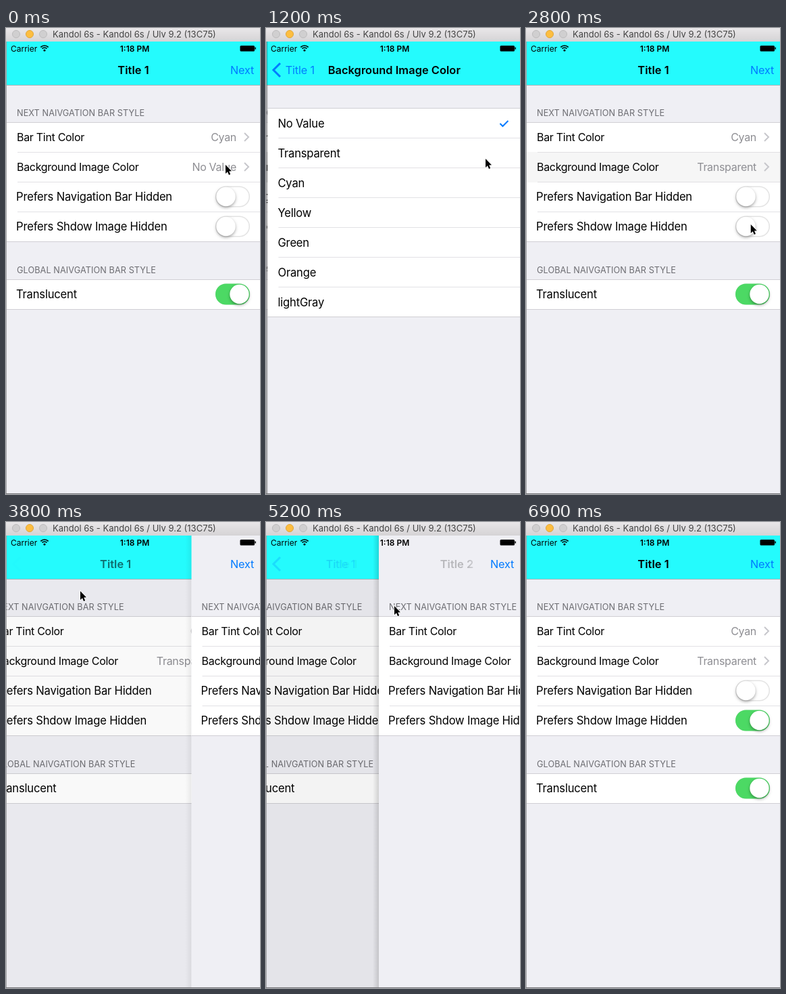
Write an HTML page with a canvas that moves like this. It is 376 px wide and 688 px high and loops after 7 s.

```html
<!DOCTYPE html>
<html lang="en">
<head>
<meta charset="utf-8">
<title>Navigation bar demo</title>
<style>
  html, body { margin: 0; width: 100%; height: 100%; overflow: hidden; background: #efeff4; }
  canvas { display: block; width: 376px; height: 688px; }
</style>
</head>
<body>
<canvas id="stage" width="376" height="688"></canvas>
<script>
const ctx = document.getElementById('stage').getContext('2d');
const LOOP = 7000, STEP = 100, WIDTH = 375;
const BLUE = '#007aff', CYAN = '#24fbfd', GRAY = '#8e8e93', BACK = '#efeff4';
const LINE = '#d0cfd4', THIN_LINE = '#e2e1e5';
const FACE = 'Inter, "Open Sans", sans-serif';
const STYLES = {
  window: [`13px ${FACE}`, 0],
  status: [`12px ${FACE}`, 0],
  clock: [`600 12px ${FACE}`, 0],
  title: [`600 16.4px ${FACE}`, 0.05],
  button: [`16.2px ${FACE}`, -0.1],
  cell: [`16px ${FACE}`, -0.3],
  label: [`16.6px ${FACE}`, -0.2],
  header: [`12.7px ${FACE}`, 0.08]
};
const COLORS = ['No Value', 'Transparent', 'Cyan', 'Yellow', 'Green', 'Orange', 'lightGray'];
const COLOR_TITLE = 'Background Image Color';

// Rows of [time, value, ...]; values are linear between rows.
const CURSOR = [
  [0, 325, 202], [700, 325, 202], [1000, 325, 193], [1200, 325, 193], [1400, 324, 182],
  [1600, 322, 181], [2000, 42, 64], [2120, 44, 64], [2200, 66, 70], [2700, 332, 290],
  [3100, 335, 290], [3500, 348, 62], [3720, 346, 62], [3800, 110, 102], [4000, 24, 117],
  [4300, 14, 118], [4450, 14, 118], [4700, 70, 120], [5200, 190, 124], [5800, 308, 128],
  [6000, 350, 131], [6100, 390, 134], [LOOP, 390, 134]
];
const DRAG = [
  [4400, 0], [4500, 3], [4600, 14], [4700, 34], [5200, 166], [5800, 288],
  [5900, 305], [6000, 342], [6100, 363], [6200, 371], [6300, 375]
];

const clamp = v => Math.max(0, Math.min(1, v));
const lerp = (a, b, k) => a + (b - a) * k;
const ramp = (t, from, span) => clamp((t - from) / span);

function track(table, t) {
  let i = 1;
  while (i < table.length - 1 && table[i][0] < t) i++;
  const a = table[i - 1], b = table[i], k = ramp(t, a[0], b[0] - a[0]);
  return a.slice(1).map((v, n) => lerp(v, b[n + 1], k));
}

function spring(ms) {
  const x = Math.max(0, ms) * 0.018;
  return x > 9 ? 1 : 1 - (1 + x) * Math.exp(-x);
}

// page: how far the upper page is moved out (0..1); bar: the same for bar items.
// fade: exponents for the root title, the back button and the upper title.
function transition(t) {
  const slide = (upper, start, push, fade) => {
    const at = ms => push ? 1 - spring(ms) : spring(ms);
    return { upper, page: at(t - start), bar: at(t - start - 12), fade };
  };
  if (t < 770) return null;
  if (t < 2128) return slide('colors', 770, true, [2.7, 2.5, 2]);
  if (t < 2800) return slide('colors', 2128, false, [1.2, 7, 2]);
  if (t < 3743.5) return null;
  if (t < 4400) return slide('second', 3743.5, true, [2.7, 2.5, 2.5]);
  if (t >= 6300) return null;
  const k = track(DRAG, t)[0] / WIDTH;
  return { upper: 'second', page: k, bar: k, fade: [4, 2.5, 2.5] };
}

function rect(x, y, w, h, color) {
  ctx.fillStyle = color;
  ctx.fillRect(x, y, w, h);
}

function setStyle(style) {
  [ctx.font, ctx.letterSpacing] = [STYLES[style][0], STYLES[style][1] + 'px'];
}

function text(str, x, y, style, color = '#000', align = 'left') {
  setStyle(style);
  ctx.textAlign = align;
  ctx.fillStyle = color;
  ctx.fillText(str, x, y);
}

function polyline(points, color, width) {
  ctx.beginPath();
  points.forEach(([x, y]) => ctx.lineTo(x, y));
  ctx.strokeStyle = color;
  ctx.lineWidth = width;
  ctx.stroke();
}

function disc(x, y, r, fill, stroke) {
  ctx.beginPath();
  ctx.arc(x, y, r, 0, 7);
  ctx.fillStyle = fill;
  ctx.fill();
  if (stroke) {
    ctx.strokeStyle = stroke;
    ctx.lineWidth = 1;
    ctx.stroke();
  }
}

function pill(x, y, w, h, r, color) {
  ctx.beginPath();
  ctx.roundRect(x, y, w, h, r);
  ctx.fillStyle = color;
  ctx.fill();
}

function withAlpha(alpha, draw) {
  ctx.save();
  ctx.globalAlpha = clamp(alpha);
  draw();
  ctx.restore();
}

function toggle(x, y, on) {
  pill(x, y - 15.5, 51, 31, 15.5, '#e3e3e3');
  pill(x + 1.5, y - 14, 48, 28, 14, '#fff');
  withAlpha(on, () => pill(x, y - 15.5, 51, 31, 15.5, '#4cd964'));
  ctx.save();
  ctx.shadowColor = 'rgba(0,0,0,.35)';
  ctx.shadowBlur = 4;
  ctx.shadowOffsetY = 2;
  disc(x + 15.5 + 20 * on, y, 14.2, '#fff');
  ctx.restore();
}

function group(x, y, rows) {
  rect(1 + x, y, WIDTH, rows * 44 + 1, '#fff');
  for (let i = 0; i <= rows; i++) {
    const inset = i % rows ? 16 : 0;
    rect(1 + x + inset, y + i * 44, WIDTH - inset, 1, inset ? THIN_LINE : LINE);
  }
}

function valueRow(x, y, name, value) {
  text(name, 16 + x, y + 6, 'cell');
  text(value, 341 + x, y + 6, 'cell', GRAY, 'right');
  polyline([[353 + x, y - 6], [359 + x, y], [353 + x, y + 6]], '#c7c7cc', 2);
}

function toggleRow(x, y, name, on) {
  text(name, 15 + x, y + 6, 'label');
  toggle(310 + x, y, on);
}

function settingsPage(x, t, isRoot) {
  rect(1 + x, 20, WIDTH, 668, BACK);
  text('NEXT NAIVGATION BAR STYLE', 16 + x, 130, 'header', '#6d6d72');
  group(x, 139, 4);
  if (isRoot && t >= 700 && t < 2900) {
    withAlpha(1 - ramp(t, 2500, 400), () => rect(1 + x, 183, WIDTH, 45, '#d9d9d9'));
  }
  valueRow(x, 161, 'Bar Tint Color', 'Cyan');
  valueRow(x, 205, 'Background Image Color', COLORS[t < 1500 ? 0 : 1]);
  toggleRow(x, 249, 'Prefers Navigation Bar Hidden', 0);
  toggleRow(x, 293, 'Prefers Shdow Image Hidden', ramp(t, 2850, 250));
  if (!isRoot) return;
  text('GLOBAL NAIVGATION BAR STYLE', 16 + x, 362, 'header', '#6d6d72');
  group(x, 371, 1);
  toggleRow(x, 393, 'Translucent', 1);
}

function colorsPage(x, t) {
  rect(1 + x, 85, WIDTH, 603, BACK);
  group(x, 118, COLORS.length);
  if (t >= 1400 && t < 1800) {
    withAlpha(1 - ramp(t, 1500, 300), () => rect(1 + x, 162, WIDTH, 44, '#d9d9d9'));
  }
  COLORS.forEach((name, i) => text(name, 16 + x, 147 + i * 44, 'label'));
  const y = t < 1500 ? 141 : 185;
  polyline([[345 + x, y], [349 + x, y + 4], [357 + x, y - 4]], BLUE, 2);
}

function barItems(move) {
  setStyle('title');
  const centered = str => 188.5 - ctx.measureText(str).width / 2;
  const q = move ? move.bar : 1;
  const [titleFade, backFade, upperFade] = move ? move.fade : [1, 1, 1];
  const labelX = lerp(28, centered('Title 1'), q);

  withAlpha(q ** titleFade, () => text('Title 1', labelX, 68, 'title'));
  withAlpha(move && move.upper === 'colors' ? q ** 4 : 1,
    () => text('Next', 332, 68, 'button', BLUE));
  if (!move) return;

  withAlpha((1 - q) ** backFade, () => {
    polyline([[21, 52], [11, 62], [21, 72]], BLUE, 3);
    text('Title 1', labelX, 68, 'button', BLUE);
  });
  withAlpha((1 - q) ** upperFade, () => {
    const name = move.upper === 'colors' ? COLOR_TITLE : 'Title 2';
    const edge = ctx.createLinearGradient(298, 0, 319, 0);
    edge.addColorStop(0, '#000');
    edge.addColorStop(1, 'rgba(0,0,0,0)');
    setStyle('title');
    text(name, lerp(centered(name), 376, q), 68, 'title', edge);
  });
}

function statusBar() {
  text('Carrier', 7, 35, 'status');
  [8, 5].forEach(r => {
    ctx.beginPath();
    ctx.arc(57, 34, r, -Math.PI * 0.75, -Math.PI * 0.25);
    ctx.strokeStyle = '#000';
    ctx.lineWidth = 1.7;
    ctx.stroke();
  });
  disc(57, 33, 1.6, '#000');
  text('1:18 PM', 190.5, 35, 'clock', '#000', 'center');
  pill(346.5, 26, 21.5, 8.5, 1.5, '#000');
  rect(368.5, 28.5, 1.5, 3, '#000');
}

function windowFrame() {
  const shade = ctx.createLinearGradient(0, 0, 0, 20);
  shade.addColorStop(0, '#e9e7e9');
  shade.addColorStop(1, '#d5d3d5');
  rect(0, 0, 376, 20, shade);
  disc(15, 9, 5.5, '#d0cfd0', '#bdbcbd');
  disc(35, 9, 5.5, '#fdbe41', '#e0a63a');
  disc(55, 9, 5.5, '#d0cfd0', '#bdbcbd');
  text('Kandol 6s - Kandol 6s / Ulv 9.2 (13C75)', 69, 14, 'window', '#444');
  rect(0, 20, 1, 668, '#a3a3a6');
  rect(0, 687, 376, 1, '#77777a');
}

function pointer(x, y) {
  ctx.save();
  ctx.translate(x, y);
  ctx.beginPath();
  [[0, 0], [0, 13], [3, 10.3], [5, 15], [7.2, 14], [5.2, 9.5], [9, 9.3]]
    .forEach(([px, py]) => ctx.lineTo(px, py));
  ctx.closePath();
  ctx.strokeStyle = '#fff';
  ctx.lineWidth = 1.6;
  ctx.stroke();
  ctx.fillStyle = '#000';
  ctx.fill();
  ctx.restore();
}

function draw(t) {
  const move = transition(t);
  const x = move ? move.page * WIDTH : WIDTH;
  ctx.save();
  ctx.beginPath();
  ctx.rect(1, 20, WIDTH, 667);
  ctx.clip();

  settingsPage(-0.3 * (WIDTH - x), t, true);
  if (x < WIDTH) rect(1, 85, x, 603, `rgba(0,0,0,${0.085 * (1 - move.page)})`);
  if (move && move.upper === 'colors') colorsPage(x, t);
  rect(1, 20, WIDTH, 64, CYAN);
  rect(1, 84, WIDTH, 1, '#a9b4b8');
  if (x < WIDTH) {
    const shadow = ctx.createLinearGradient(x - 8, 0, x + 1, 0);
    shadow.addColorStop(0, 'rgba(0,0,0,0)');
    shadow.addColorStop(1, `rgba(0,0,0,${0.25 * (1 - move.page)})`);
    rect(x - 8, 20, 9, 668, shadow);
  }
  if (move && move.upper === 'second') settingsPage(x, t, false);
  barItems(move);
  statusBar();
  ctx.restore();

  windowFrame();
  pointer(...track(CURSOR, t));
}

const start = performance.now();
function tick() {
  const t = (performance.now() - start) % LOOP;
  draw(Math.floor(t / STEP) * STEP);
  requestAnimationFrame(tick);
}
tick();
</script>
</body>
</html>
```
